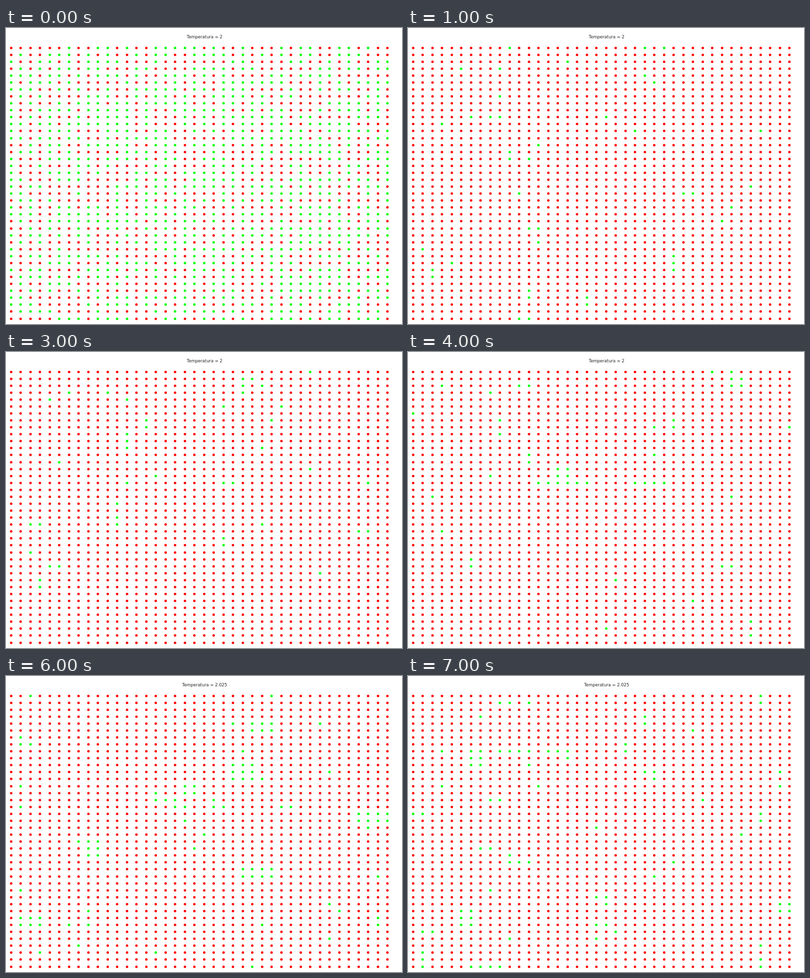
Write an HTML page that moves like this. It is 800x600 px and loops after 8000 ms.

```html
<!DOCTYPE html>
<html lang="es">
<head>
<meta charset="utf-8">
<title>Temperatura</title>
<style>
html, body { margin: 0; width: 100%; height: 100%; overflow: hidden; background: #fff; }
svg { display: block; width: 800px; height: 600px; }
text { font: 8.5px "DejaVu Sans", sans-serif; fill: #222; text-anchor: middle; }
</style>
</head>
<body>
<svg viewBox="0 0 800 600">
  <text id="title" x="401.2" y="21"></text>
  <g id="grid"></g>
</svg>
<script>
const N = 40, STEP = 1000;
const UP = '#f00', DOWN = '#0f0';

function random(seed) {
  return () => {
    seed = (seed + 0x6d2b79f5) | 0;
    let t = Math.imul(seed ^ (seed >>> 15), 1 | seed);
    t = (t + Math.imul(t ^ (t >>> 7), 61 | t)) ^ t;
    return ((t ^ (t >>> 14)) >>> 0) / 4294967296;
  };
}

// Hot start: every spin is random; a share of them is turned over.
function hot(flips) {
  const rnd = random(11), turn = random(29);
  return Array.from({ length: N * N }, () => (rnd() < 0.5) !== (turn() < flips));
}

// Cold state: main islands as [col, row, width, height], plus small seeded
// clusters that grow right or down from a random spin.
function cold(seed, count, islands = []) {
  const rnd = random(seed), down = Array(N * N).fill(false);
  const flip = (col, row) => { down[(row % N) * N + col % N] = true; };
  const pick = () => Math.floor(rnd() * N);
  for (const [col, row, w, h] of islands)
    for (let i = 0; i < w * h; i++) flip(col + i % w, row + Math.floor(i / w));
  for (let i = 0; i < count; i++) {
    let col = pick(), row = pick();
    flip(col, row);
    while (rnd() < 0.3) {
      if (rnd() < 0.5) col++;
      else row++;
      flip(col, row);
    }
  }
  return down;
}

const runs = [
  { label: '2', states: [
    hot(0),
    cold(5, 32),
    cold(7, 28, [[26, 35, 2, 3], [8, 38, 3, 1]]),
    cold(17, 34),
    cold(23, 26, [[15, 14, 2, 3], [13, 16, 6, 1], [23, 16, 4, 1], [33, 1, 2, 2]])
  ] },
  { label: '2.025', states: [
    hot(0.15),
    cold(31, 38, [[25, 4, 3, 2], [23, 10, 3, 3], [36, 17, 4, 2], [8, 21, 2, 3], [24, 25, 4, 2], [1, 32, 3, 2]]),
    cold(41, 38, [[6, 8, 2, 3], [9, 8, 4, 1], [5, 31, 2, 3], [38, 30, 2, 2], [6, 39, 4, 1]])
  ] }
];
const frames = runs.flatMap(({ label, states }) => states.map(down => ({ label, down })));

const title = document.getElementById('title');
const grid = document.getElementById('grid');

// Dots sit on whole pixels.
const dots = Array.from({ length: N * N }, (_, i) => {
  const dot = document.createElementNS('http://www.w3.org/2000/svg', 'circle');
  const col = i % N, row = Math.floor(i / N);
  dot.setAttribute('cx', Math.round(10 + col * 760 / 39) + 0.5);
  dot.setAttribute('cy', Math.floor(40 + row * 549 / 39) + 0.5);
  dot.setAttribute('r', 2.5);
  grid.append(dot);
  return dot;
});

let shown = -1;
function draw(time) {
  const i = Math.floor(time / STEP) % frames.length;
  if (i === shown) return;
  shown = i;
  const { label, down } = frames[i];
  title.textContent = 'Temperatura = ' + label;
  dots.forEach((dot, k) => dot.setAttribute('fill', down[k] ? DOWN : UP));
}

const start = performance.now();
function tick() {
  draw(performance.now() - start);
  requestAnimationFrame(tick);
}
tick();
</script>
</body>
</html>
```
